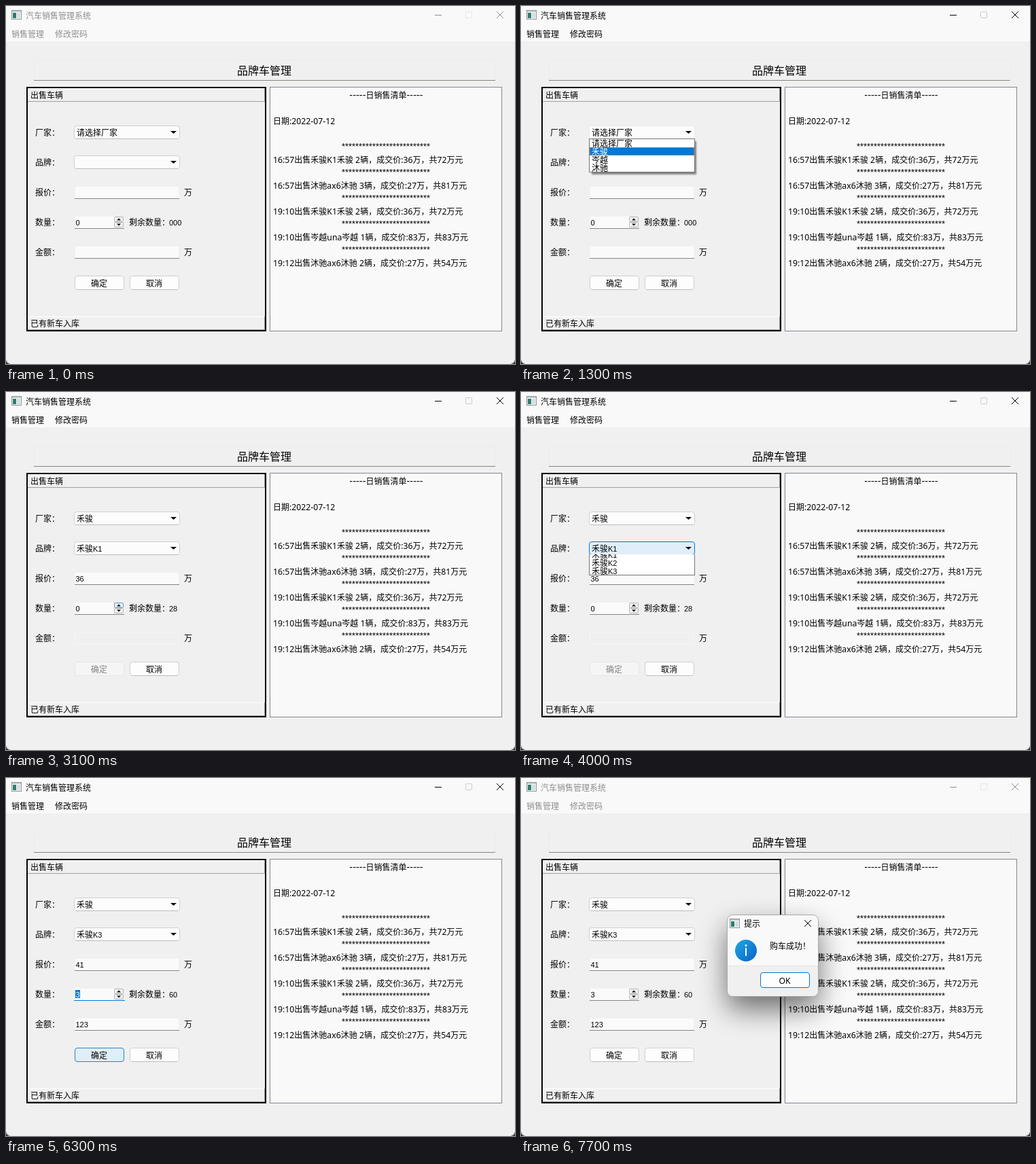
Animation of 749x527 px, one loop 8 s. Source, as an HTML page:

```html
<!DOCTYPE html>
<html lang="zh-CN">
<head>
<meta charset="utf-8">
<title>汽车销售管理系统</title>
<style>
  html, body { margin: 0; width: 100%; height: 100%; overflow: hidden; background: #f0f0f0; }
  svg { display: block; }
  #stage { width: 100%; height: 100%; }
  text { font: 12px 'Noto Sans CJK SC', 'Noto Sans CJK', sans-serif; white-space: pre; }
  tspan { font: 11px 'Liberation Sans', sans-serif; }
  .log tspan { font: 12.25px 'Noto Sans', 'Open Sans', sans-serif; }
  .log .dash tspan { font: 13.4px 'DejaVu Sans', sans-serif; }
  .log .star tspan { font: 12.85px 'Liberation Sans', sans-serif; }
</style>
</head>
<body>
<svg id="stage" viewBox="0 0 749 527"></svg>
<script>
const stage = document.getElementById('stage');
const LOOP = 8000, TICK = 100;
const BLUE = '#0078d4';
const PICK = '请选择厂家';
const MAKERS = [PICK, '禾骏', '岑越', '沐驰'];
const MODELS = ['禾骏K1', '禾骏K2', '禾骏K3'];
const LOG = [
  '16:57出售禾骏K1禾骏 2辆，成交价:36万，共72万元',
  '16:57出售沐驰ax6沐驰 3辆，成交价:27万，共81万元',
  '19:10出售禾骏K1禾骏 2辆，成交价:36万，共72万元',
  '19:10出售岑越una岑越 1辆，成交价:83万，共83万元',
  '19:12出售沐驰ax6沐驰 2辆，成交价:27万，共54万元'
];

// Last value whose start time has passed
const at = (t, first, ...steps) => steps.reduce((v, [from, next]) => t >= from ? next : v, first);

const mix = (a, b, k) => '#' + [1, 3, 5].map(i => {
  const p = parseInt(a.substr(i, 2), 16), q = parseInt(b.substr(i, 2), 16);
  return Math.round(p + (q - p) * k).toString(16).padStart(2, '0');
}).join('');

const rect = (x, y, w, h, fill, extra = '') =>
  `<rect x="${x}" y="${y}" width="${w}" height="${h}" fill="${fill}" ${extra}/>`;

const box = (x, y, w, h, fill, stroke, r = 0, extra = '') =>
  rect(x + .5, y + .5, w - 1, h - 1, fill, `stroke="${stroke}" rx="${r}" ${extra}`);

const path = (d, color, extra = '') => `<path d="${d}" fill="none" stroke="${color}" ${extra}/>`;

// Text centred vertically on cy; Latin runs get their own font
const text = (x, cy, s, fill = '#000', extra = '') =>
  `<text x="${x}" y="${cy + 4.5}" fill="${fill}" ${extra}>` +
  String(s).replace(/[!-~ ]+/g, run => `<tspan>${run}</tspan>`) + '</text>';

const mid = 'text-anchor="middle"';

const appIcon = (x, y) =>
  box(x, y, 15, 14, '#f4f6f6', '#8d9499') + rect(x + 1, y + 1, 13, 2, '#c5ccd0') +
  rect(x + 2, y + 4, 5, 8, '#2f7d6d') + rect(x + 8, y + 4, 5, 8, '#d5dde0');

const cross = (x, y, color) => path(`M${x} ${y}l10 10m0 -10l-10 10`, color);

function titleBar(active) {
  const ink = active ? '#000' : '#8e8e8e';
  return rect(0, 0, 749, 52, '#f9f9f9') + appIcon(8, 6) +
    text(29, 14, '汽车销售管理系统', ink) +
    path('M631 13.5h10', ink) +
    box(676, 8, 10, 10, 'none', active ? '#cacaca' : '#e6e6e6', 1) +
    cross(722, 8, ink) +
    text(8, 41, '销售管理', ink) + text(72, 41, '修改密码', ink);
}

const tab = (y, label) =>
  rect(32, y, 349, 20, '#f0f0f0') + path(`M32.5 ${y + 19}V${y + .5}H381`, '#fff') +
  path(`M32 ${y + 19.5}H380.5V${y}`, '#a0a0a0') + text(36, y + 10, label);

function panels() {
  const rows = LOG.map((line, i) => {
    const y = 226 + i * 38;
    return `<g class="star">${text(559, y - 19.5, '*'.repeat(26), '#000', mid)}</g>` + text(393, y, line);
  }).join('');
  return box(41, 79, 680, 31, '#f0f0f0', '#ebebeb', 2) + path('M41 109.5H720', '#868686') +
    text(380, 96.5, '品牌车管理', '#000', mid + ' style="font-size:16px"') +
    rect(31, 120, 351, 358, '#f0f0f0', 'stroke="#000" stroke-width="2"') +
    tab(121, '出售车辆') + tab(457, '已有新车入库') +
    box(388, 119, 342, 360, '#f9f9f9', '#828790') +
    `<g class="log"><g class="dash">${text(559.5, 131, '-----日销售清单-----', '#000', mid)}</g>` +
    text(393, 169, '日期:2022-07-12') + rows + '</g>';
}

function combo(y, label, hover, flat) {
  const edge = flat ? '#ebebeb' : mix('#d0d0d0', BLUE, hover);
  const base = flat ? '#e4e4e4' : mix('#bcbcbc', BLUE, hover);
  return box(100, y, 156, 20, mix('#fcfcfc', '#e0eef9', hover), edge, 3.5) +
    path(`M103 ${y + 19.5}H253`, base) +
    `<path d="M242 ${y + 8}h9l-4.5 4z"/>` + text(104, y + 10, label);
}

const field = (y, w, on, value) =>
  box(101, y, w, 19, on ? '#fafafa' : '#f0f0f0', on ? '#f1f1f1' : '#f6f6f6', 2) +
  (on ? path(`M101 ${y + 18.5}h${w}`, '#868686') : '') + text(102.5, y + 9.5, value);

function spin(s) {
  const arrow = (y, tip, hover) =>
    box(159, y, 14, 8, mix('#f0f0f0', '#e0eef9', hover), mix('#b4b4b4', BLUE, hover), 1) +
    `<path d="M163 ${tip ? y + 5.5 : y + 2.5}h6l-3 ${tip ? -3 : 3}z"/>`;
  return field(309, 73, true, s.selected ? '' : s.count) +
    (s.selected ? rect(102, 312, 7, 12, '#0078d7') + text(102.5, 318.5, s.count, '#fff') : '') +
    arrow(310, true, s.up) + arrow(318, false, s.down) +
    (s.focus ? path('M100 327.5H175', BLUE) : '');
}

function button(x, label, on, hover) {
  const edge = on ? mix('#d0d0d0', '#2b83c6', hover) : '#e6e6e6';
  return box(x, 397, 73, 21, on ? mix('#fdfdfd', '#e0eef9', hover) : '#f5f5f5', edge, 3.5) +
    (on ? path(`M${x + 3} 417.5h67`, mix('#bebebe', '#2b83c6', hover)) : '') +
    text(x + 36, 408, label, on ? '#000' : '#848484', mid);
}

// Drop-down list that rolls out from its top edge
function popup(y, items, chosen, shown) {
  const full = items.length * 12 + 2;
  const h = Math.round(full * shown);
  if (!h) return '';
  const list = items.map((item, i) => {
    const on = i === chosen && shown === 1, top = 1 + i * 12;
    return (on ? rect(1, top, 154, 12, '#0078d7') +
      box(1, top, 154, 12, 'none', '#ff8728', 0, 'stroke-dasharray="1" stroke-dashoffset=".5"') : '') +
      text(4, top + 6, item, on ? '#fff' : '#000');
  }).join('');
  return (shown === 1 ? rect(104, y + 4, 154, full - 1, '#000', 'opacity=".45" filter="url(#soft)"') : '') +
    `<svg x="100" y="${y}" width="156" height="${h}"><g transform="translate(0 ${h - full})">` +
    box(0, 0, 156, full, '#fff', '#767676') + list + '</g></svg>';
}

function dialog(k) {
  if (!k) return '';
  const scale = .9 + .1 * k;
  return `<g opacity="${k}" transform="translate(370.5 261.5) scale(${scale}) translate(-370.5 -261.5)">` +
    rect(304, 220, 133, 120, '#000', 'rx="8" opacity=".55" filter="url(#deep)"') +
    rect(303.5, 201.5, 134, 120, '#f9f9f9', 'rx="8" stroke="#a9a9a9"') +
    '<path d="M304 276h133v37a8 8 0 0 1-8 8h-117a8 8 0 0 1-8-8z" fill="#f0f0f0"/>' +
    path('M304 276.5h133', '#e4e4e4') +
    appIcon(307, 207) + text(328, 214, '提示') + cross(417, 209, '#000') +
    '<circle cx="331" cy="254" r="16" fill="url(#info)"/>' +
    '<circle cx="331" cy="246.5" r="1.5" fill="#fff"/>' + rect(330, 250, 2, 12, '#fff') +
    text(366, 247, '购车成功！') +
    box(352, 286, 73, 23, '#fdfdfd', BLUE, 3.5) +
    `<g class="log">${text(388, 298, 'OK', '#000', mid)}</g></g>`;
}

const DEFS = `<defs>
  <filter id="soft" x="-10%" y="-30%" width="120%" height="160%"><feGaussianBlur stdDeviation="1.3"/></filter>
  <filter id="deep" x="-80%" y="-80%" width="260%" height="260%"><feGaussianBlur stdDeviation="21"/></filter>
  <linearGradient id="info" x2="1" y2="1"><stop stop-color="#1fa8e6"/><stop offset="1" stop-color="#0a62c4"/></linearGradient>
</defs>`;

function state(t) {
  const makerSet = t >= 1800, modelSet = t >= 4600;
  const count = at(t, 0, [5400, 1], [5600, 2], [5800, 3]);
  const price = modelSet ? 41 : makerSet ? 36 : '';
  return {
    active: t >= 700 && t < 7500,
    maker: makerSet ? MAKERS[1] : PICK,
    makerHover: at(t, 0, [300, .5], [500, 1], [1000, 0]),
    makerFlat: t >= 1000 && t < 1900,
    makerList: at(t, 0, [800, .3], [900, .6], [1000, .85], [1100, 1], [1800, 0]),
    makerRow: t < 1300 ? 0 : 1,
    model: modelSet ? MODELS[2] : makerSet ? MODELS[0] : '',
    modelHover: at(t, 0, [2000, .6], [2100, .5], [2200, .35], [2300, .15], [2400, 0],
      [3800, .6], [3900, 1], [4100, 0]),
    modelFlat: t >= 4100 && t < 4700,
    modelList: at(t, 0, [3900, .4], [4000, .81], [4100, 1], [4600, 0]),
    modelRow: t < 4200 ? 0 : 2,
    price, count,
    left: modelSet ? '60' : makerSet ? '28' : '000',
    ready: !makerSet || count > 0,
    total: count ? price * count : '',
    up: at(t, 0, [3100, .5], [3200, 1], [3600, .6], [3800, 0], [5100, 1], [5900, 0]),
    down: at(t, 0, [2700, .4], [2800, .7], [2900, 0], [5000, .5], [5100, 0]),
    selected: count > 0 && t < 7500,
    focus: t >= 5800 && t < 7500,
    okHover: at(t, 0, [6000, .25], [6100, .5], [6200, .8], [6300, 1], [7500, .4], [7600, 0]),
    dialog: at(t, 0, [7500, .35], [7600, .75], [7700, 1])
  };
}

function draw(s) {
  const labels = ['厂家：', '品牌：', '报价：', '数量：', '金额：']
    .map((label, i) => text(43, 186 + i * 44, label)).join('');
  return DEFS + rect(0, 0, 749, 527, '#f0f0f0') + titleBar(s.active) + panels() + labels +
    combo(176, s.maker, s.makerHover, s.makerFlat) +
    combo(220, s.model, s.modelHover, s.modelFlat) +
    field(265, 154, true, s.price) + text(262, 274, '万') +
    spin(s) + text(181, 318, '剩余数量：') + text(240, 318, s.left) +
    field(353, 154, s.ready, s.total) + text(262, 362, '万') +
    button(101, '确定', s.ready, s.okHover) + button(182, '取消', true, 0) +
    popup(195, MAKERS, s.makerRow, s.makerList) +
    popup(239, MODELS, s.modelRow, s.modelList) +
    path('M0 521q1 5 6 6M749 521q-1 5-6 6', '#9a9a9a') +
    '<path d="M0 522q1 4 5 5H0zM749 522q-1 4-5 5h5z" fill="#333"/>' +
    dialog(s.dialog);
}

let last = -1;
const start = performance.now();
function frame() {
  const tick = Math.floor((performance.now() - start) % LOOP / TICK);
  if (tick !== last) {
    last = tick;
    stage.innerHTML = draw(state(tick * TICK));
  }
  requestAnimationFrame(frame);
}
frame();
</script>
</body>
</html>
```
